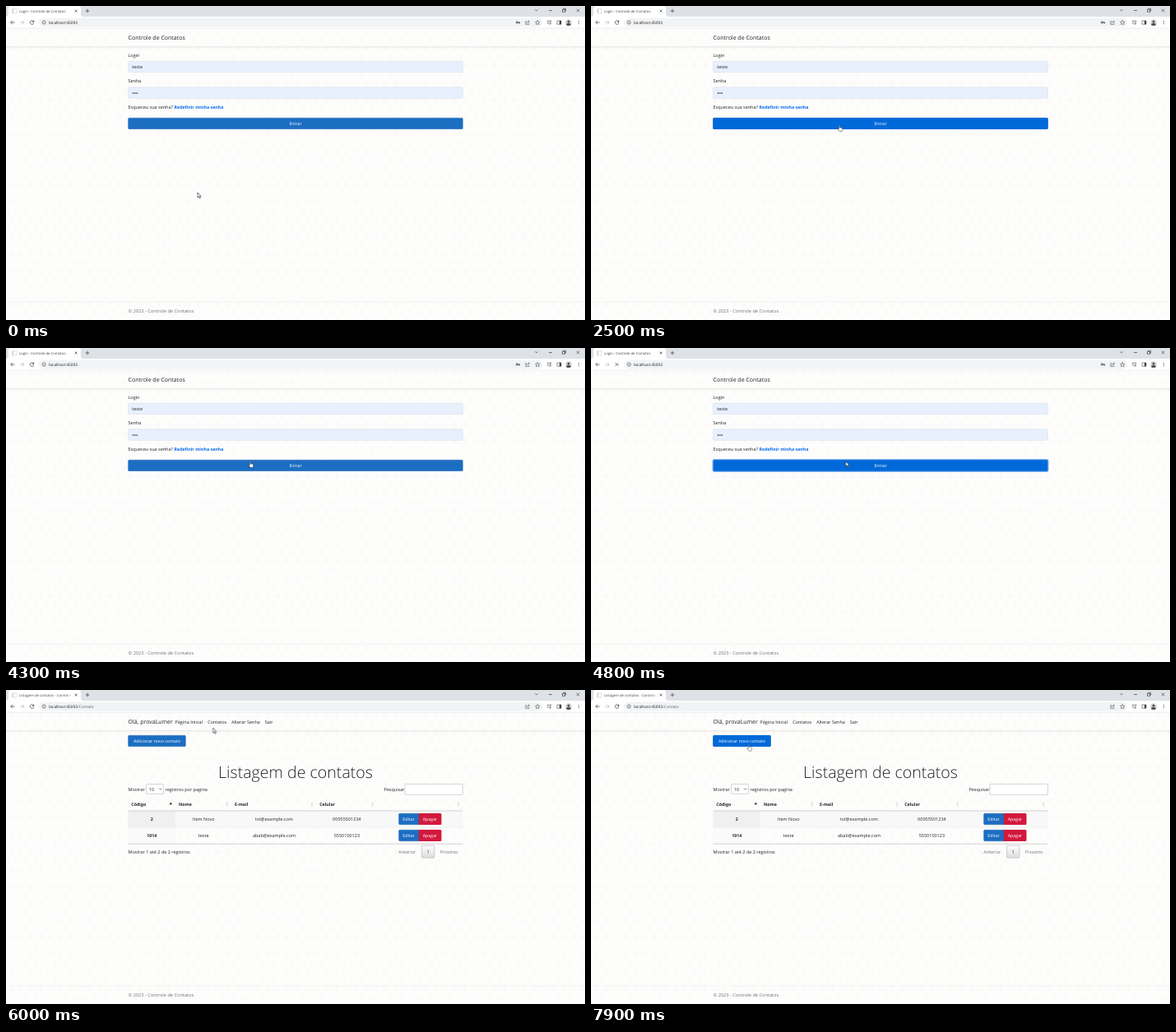
Write an HTML page that moves like this. It is 704x382 px and loops after 8000 ms.

```html
<!DOCTYPE html>
<html lang="pt">
<head>
<meta charset="utf-8">
<title>Controle de Contatos</title>
<style>
html, body { margin: 0; width: 100%; height: 100%; overflow: hidden; background: #fff; }
svg { display: block; width: 100vw; height: 100vh; }
text { font: 5.5px "Open Sans", "Noto Sans", sans-serif; fill: #212529; text-rendering: geometricPrecision; white-space: pre; }
.brand { font-size: 7px; }
.title { font-size: 19.6px; font-weight: 300; }
.tab { font-size: 4.25px; fill: #3c4043; }
.url { font-size: 4.8px; fill: #202124; }
.path { fill: #5f6368; }
.bold { font-weight: 700; font-size: 5.3px; }
.link { fill: #0b6cf0; }
.mid { text-anchor: middle; }
.btn { font-size: 5.3px; fill: #fff; text-anchor: middle; }
.mute { fill: #6c757d; }
.foot { font-size: 5.65px; }
.line { fill: none; stroke: #3c4043; stroke-width: .7; }
.field { fill: #e8f0fe; stroke: #ced4da; stroke-width: .4; }
.box { fill: #fff; stroke: #aaa; stroke-width: .5; }
.blue { fill: #1b6ec2; stroke: #1861ac; stroke-width: .4; }
.red { fill: #d2193d; }

/* 100 ms of the loop is 1.25%; the small lead keeps steps clear of the 100 ms marks */
.login, .home, .list, .load, .still, .hot, .ring, .caret, .add, .arrow, .beam, .hand, .cursor {
  animation: 8s step-end -20ms infinite;
}
.login { animation-name: login; }
.home { animation-name: home; }
.list { animation-name: list; }
.load { animation-name: load; }
.still { animation-name: still; }
.hot { animation-name: hot; }
.ring { animation-name: ring; }
.caret { animation-name: caret; }
.add { animation-name: add; }
.arrow { animation-name: arrow; }
.beam { animation-name: beam; }
.hand { animation-name: hand; }
.cursor { animation-name: move; }
@keyframes login { 0% { opacity: 1 } 63.75%, 100% { opacity: 0 } }
@keyframes home { 0%, 73.75%, 100% { opacity: 0 } 63.75% { opacity: 1 } }
@keyframes list { 0% { opacity: 0 } 73.75%, 100% { opacity: 1 } }
@keyframes load { 0%, 63.75%, 73.75%, 100% { opacity: 0 } 58.75%, 72.5% { opacity: 1 } }
@keyframes still { 0%, 63.75%, 73.75%, 100% { opacity: 1 } 58.75%, 72.5% { opacity: 0 } }
@keyframes hot { 0%, 33.75%, 100% { opacity: 0 } 28.75%, 56.25% { opacity: 1 } }
@keyframes ring { 0% { opacity: 0 } 57.5%, 100% { opacity: 1 } }
@keyframes caret { 0%, 46.25%, 100% { opacity: 0 } 40% { opacity: 1 } }
@keyframes add { 0% { opacity: 0 } 86.25%, 100% { opacity: 1 } }
@keyframes arrow {
  0%, 23.75%, 33.75%, 50%, 58.75%, 75% { opacity: 1 }
  20%, 28.75%, 36.25%, 53.75%, 70%, 86.25%, 100% { opacity: 0 }
}
@keyframes beam { 0%, 23.75%, 50%, 100% { opacity: 0 } 20%, 36.25% { opacity: 1 } }
@keyframes hand {
  0%, 33.75%, 58.75%, 75% { opacity: 0 }
  28.75%, 53.75%, 70%, 86.25%, 100% { opacity: 1 }
}
@keyframes move {
  0% { transform: translate(233px, 227px) }
  17.5% { transform: translate(233px, 227px); animation-timing-function: steps(2) }
  20% { transform: translate(257px, 103px) }
  21.25% { transform: translate(257px, 103px); animation-timing-function: steps(7) }
  30% { transform: translate(302px, 145px) }
  32.5% { transform: translate(302px, 145px); animation-timing-function: steps(5) }
  38.75% { transform: translate(222px, 76px) }
  40% { transform: translate(222px, 76px); animation-timing-function: steps(2) }
  42.5% { transform: translate(224.5px, 82px) }
  43.75% { transform: translate(224.5px, 82px); animation-timing-function: steps(9) }
  55% { transform: translate(306px, 145px) }
  56.25% { transform: translate(309.7px, 138px) }
  62.5% { transform: translate(309.7px, 138px); animation-timing-function: steps(3) }
  66.25% { transform: translate(258px, 56px); animation-timing-function: steps(2) }
  68.75% { transform: translate(252.5px, 46px); animation-timing-function: steps(2) }
  71.25% { transform: translate(254px, 40px) }
  73.75% { transform: translate(254px, 40px); animation-timing-function: steps(2) }
  76.25% { transform: translate(249.3px, 52.5px) }
  82.5% { transform: translate(249.3px, 52.5px); animation-timing-function: steps(5) }
  88.75% { transform: translate(197px, 66px); animation-timing-function: steps(2) }
  91.25%, 100% { transform: translate(191.7px, 66.5px) }
}
</style>
</head>
<body>
<svg viewBox="0 0 704 382" preserveAspectRatio="none">
  <defs>
    <circle id="c" r="12" fill="none" stroke="#f8f7f4" stroke-width=".5"/>
    <pattern id="petals" width="12" height="20.78" patternUnits="userSpaceOnUse">
      <use href="#c"/><use href="#c" x="12"/><use href="#c" y="20.78"/><use href="#c" x="12" y="20.78"/>
      <use href="#c" x="6" y="10.39"/><use href="#c" x="-6" y="10.39"/><use href="#c" x="18" y="10.39"/>
      <use href="#c" x="6" y="-10.39"/><use href="#c" x="6" y="31.17"/>
    </pattern>
    <linearGradient id="fade"><stop stop-color="#fff" stop-opacity="0"/><stop offset="1" stop-color="#fff"/></linearGradient>
    <linearGradient id="shade" x2="0" y2="1"><stop stop-color="#000" stop-opacity=".07"/><stop offset="1" stop-color="#000" stop-opacity="0"/></linearGradient>
    <linearGradient id="page" x2="0" y2="1"><stop stop-color="#fff"/><stop offset="1" stop-color="#dcdcdc"/></linearGradient>
    <clipPath id="tabClip"><path d="M14 0H80V13H14Z"/></clipPath>
    <clipPath id="face"><circle cx="684" cy="20" r="4"/></clipPath>
    <g id="sort" fill="#d0d0d0"><path d="M-1.6-.7H1.6L0-2.6Z"/><path d="M-1.6 .7H1.6L0 2.6Z"/></g>
    <g id="nav">
      <text class="brand" x="148.5" y="41.4">Olá, provaLumer</text>
      <text x="205.5" y="41">Página Inicial</text>
      <text x="245.2" y="41">Contatos</text>
      <text x="274.2" y="41">Alterar Senha</text>
      <text x="314.8" y="41">Sair</text>
    </g>
  </defs>

  <!-- page -->
  <path fill="#fefefd" d="M0 27H704V382H0Z"/>
  <path fill="url(#petals)" d="M0 27H704V382H0Z"/>
  <path fill="url(#shade)" d="M0 49H704V52H0Z"/>
  <path stroke="#e8eaeb" stroke-width=".5" d="M0 49H704M0 360H704"/>
  <text class="mute foot" x="148.5" y="373.2">© 2023 - Controle de Contatos</text>

  <!-- browser -->
  <path fill="#dee1e6" d="M0 0H704V13H0Z"/>
  <path fill="#fff" d="M0 13H704V27H0Z"/>
  <path stroke="#dadce0" stroke-width=".5" d="M0 27.2H704"/>
  <path fill="#fff" d="M0 13Q3 13 3 10V3Q3 0 6 0H88Q91 0 91 3V10Q91 13 94 13Z"/>
  <path fill="#fff" stroke="#c3c7cc" stroke-width=".5" d="M8 3.5H12.5V9H8Z"/>
  <path stroke="#8a9097" stroke-width=".5" d="M8.2 4V8.8"/>
  <path class="line" d="M83.6 4.6l2.8 2.8m0-2.8l-2.8 2.8M96.7 6H101.3M99 3.7V8.3"/>
  <path class="line" d="M643.4 4.3L645 5.9L646.6 4.3M660 5.5H664M676.5 4.3H679.5V7.3H676.5ZM677.6 4V3.2H680.6V6.2H679.8M693.8 3.7l3.4 3.4m0-3.4l-3.4 3.4"/>
  <rect x="40" y="14.7" width="612" height="10.8" rx="5.4" fill="#f1f3f4"/>
  <path class="line" d="M10.6 20H5.8M8 17.7L5.7 20L8 22.3"/>
  <path class="line" style="stroke:#b4b7bb" d="M17.2 20H22M19.8 17.7L22.1 20L19.8 22.3"/>
  <g class="still"><path class="line" d="M33.2 18.4A2.3 2.3 0 1 0 33.8 20.6"/><path fill="#3c4043" d="M34.1 17.3V19.7H31.7Z"/></g>
  <path class="line load" d="M29.6 18.1l3.8 3.8m0-3.8l-3.8 3.8"/>
  <g class="line" style="stroke-width:.55">
    <circle cx="46.2" cy="20" r="2.1"/><path d="M46.2 19.8V21.2M46.2 18.7V19.2"/>
    <path d="M633.2 18.6H631.8V22.3H636V21M633.2 21Q633.4 18.9 636 18.9M635 17.6L636.5 18.9L635 20.2"/>
    <path d="M646.3 17.4l.8 1.8 1.9.2-1.4 1.3.4 1.9-1.7-1-1.7 1 .4-1.9-1.4-1.3 1.9-.2z"/>
    <path d="M657.8 18H662M657.8 19.7H660.5M657.8 21.4H659.6M662.2 18V21.5M662.2 18.2H663.4"/><circle cx="661.5" cy="21.6" r=".7"/>
    <path d="M670 17.9H675V22.2H670Z"/>
  </g>
  <path fill="#3c4043" d="M672.9 18H675V22.2H672.9Z"/>
  <g clip-path="url(#face)"><circle cx="684" cy="20" r="4" fill="#d8d8da"/><circle cx="684" cy="18.9" r="1.5" fill="#54504f"/><ellipse cx="684" cy="23.6" rx="3" ry="2.8" fill="#54504f"/></g>
  <g fill="#3c4043"><circle cx="696.3" cy="18.2" r=".55"/><circle cx="696.3" cy="20" r=".55"/><circle cx="696.3" cy="21.8" r=".55"/></g>

  <g class="login">
    <text class="tab" x="16" y="7.7">Login - Controle de Contatos</text>
    <text class="url" x="52" y="21.8">localhost:45093</text>
    <path fill="none" stroke="#3c4043" stroke-width="1" d="M622.3 20H625M624.4 20V21.4"/>
    <circle cx="621.4" cy="20" r="1.1" fill="none" stroke="#3c4043" stroke-width=".9"/>
    <text class="brand" x="148.5" y="41.4">Controle de Contatos</text>
    <text x="148.5" y="62">Login</text>
    <rect class="field" x="148.6" y="67.2" width="406.8" height="13.6" rx="1.4"/>
    <text x="153.3" y="76.2">teste</text>
    <path class="caret" stroke="#111" stroke-width=".5" d="M166.3 71V77.4"/>
    <text x="148.5" y="93.3">Senha</text>
    <rect class="field" x="148.6" y="98.7" width="406.8" height="13.6" rx="1.4"/>
    <g fill="#111"><circle cx="154.5" cy="106" r=".8"/><circle cx="156.9" cy="106" r=".8"/><circle cx="159.3" cy="106" r=".8"/></g>
    <text x="148.5" y="125">Esqueceu sua senha?</text>
    <text class="bold link" x="204.5" y="125">Redefinir minha senha</text>
    <rect class="blue" x="148.6" y="136.2" width="406.8" height="13.6" rx="1.4"/>
    <rect class="hot" x="148.4" y="136" width="407.2" height="14" rx="1.5" fill="#0069d9"/>
    <rect class="ring" x="148" y="135.6" width="408" height="14.8" rx="1.8" fill="none" stroke="#7db4ee" stroke-width="1.1"/>
    <text class="btn" x="352" y="145">Entrar</text>
  </g>

  <g class="home">
    <text class="tab" x="16" y="7.7" clip-path="url(#tabClip)">Página Inicial - Controle de Contatos</text>
    <text class="url" x="52" y="21.8">localhost:45093<tspan class="path">/Home</tspan></text>
    <use href="#nav"/>
    <text class="title mid" x="352" y="75.8">Bem vindo!</text>
    <text class="mid" x="352" y="89.2">Sistema de controle de Contatos</text>
  </g>

  <g class="list">
    <text class="tab" x="16" y="7.7" clip-path="url(#tabClip)">Listagem de contatos - Controle de Contatos</text>
    <text class="url" x="52" y="21.8">localhost:45093<tspan class="path">/Contato</tspan></text>
    <use href="#nav"/>
    <rect class="blue" x="148.6" y="55.2" width="69.8" height="13.6" rx="1.4"/>
    <rect class="add" x="148.4" y="55" width="70.2" height="14" rx="1.5" fill="#0069d9"/>
    <text class="btn" x="183.5" y="64">Adicionar novo contato</text>
    <text class="title mid" x="352" y="107.2">Listagem de contatos</text>
    <text x="148.5" y="123">Mostrar</text>
    <rect class="box" x="170.6" y="114.6" width="20.8" height="11.8" rx="1.1"/>
    <text x="173.8" y="122.6">10</text>
    <path class="line" d="M186.2 119.7L187.7 121.2L189.2 119.7"/>
    <text x="193.5" y="123">registros por pagina</text>
    <text x="459.4" y="123">Pesquisar</text>
    <rect class="box" x="485" y="114.4" width="70.4" height="12.9" rx="1.1"/>

    <path fill="#f8f8f8" d="M148.4 147H555.6V167H148.4Z"/>
    <path fill="#f0f0f0" d="M148.4 147H206V167H148.4Z"/>
    <path fill="#fafafa" d="M148.4 167H206V187H148.4Z"/>
    <path stroke="#dee2e6" stroke-width=".4" d="M148.4 167H555.6"/>
    <path stroke="#a9abad" stroke-width=".5" d="M148.4 147H555.6M148.4 187.2H555.6"/>
    <text class="bold" x="152.3" y="141">Código</text>
    <text class="bold" x="210" y="141">Nome</text>
    <text class="bold" x="278" y="141">E-mail</text>
    <text class="bold" x="381.2" y="141">Celular</text>
    <path fill="#333" d="M198.5 139.2H202.1L200.3 136.6Z"/>
    <use href="#sort" x="268.5" y="139"/><use href="#sort" x="372" y="139"/><use href="#sort" x="445.7" y="139"/><use href="#sort" x="550" y="139"/>
    <g class="mid">
      <text class="bold" x="177.2" y="159">2</text>
      <text x="240.2" y="159">Item Novo</text>
      <text x="326" y="159">tst@example.com</text>
      <text x="414.4" y="159">00955501234</text>
      <text class="bold" x="177.2" y="179">1014</text>
      <text x="240.2" y="179">teste</text>
      <text x="326" y="179">abab@example.com</text>
      <text x="414.4" y="179">5550100123</text>
    </g>
    <g id="acts">
      <path class="blue" d="M502 150.2H479Q477.6 150.2 477.6 151.6V162.4Q477.6 163.8 479 163.8H502Z"/>
      <path class="red" d="M501.8 150H528Q529.5 150 529.5 151.5V162.5Q529.5 164 528 164H501.8Z"/>
      <text class="btn" x="489.5" y="159">Editar</text>
      <text class="btn" x="515.5" y="159">Apagar</text>
    </g>
    <use href="#acts" y="20"/>
    <text x="148.5" y="198.6">Mostrar 1 até 2 de 2 registros</text>
    <text class="mute" x="477.2" y="198.8">Anterior</text>
    <rect x="505.6" y="189.2" width="15.2" height="15" rx=".8" fill="url(#page)" stroke="#a5a5a5" stroke-width=".5"/>
    <text class="mid" x="513.2" y="198.8">1</text>
    <text class="mute" x="528" y="198.8">Proximo</text>
  </g>
  <path fill="url(#fade)" d="M73 2H81V11H73Z"/>

  <g class="cursor">
    <path class="arrow" fill="#fff" stroke="#222" stroke-width=".6" d="M0 0V6L1.4 4.8L2.4 7.1L3.4 6.7L2.4 4.4H4.2Z"/>
    <path class="beam" fill="none" stroke="#222" stroke-width=".6" d="M-1.4-2.9H-.5L0-2.5L.5-2.9H1.4M0-2.5V2.5M-1.4 2.9H-.5L0 2.5L.5 2.9H1.4"/>
    <path class="hand" fill="#fff" stroke="#222" stroke-width=".5" d="M-.6 4.6V.5Q0-.4 .6 .5V3Q1.2 2.5 1.7 3.1Q2.3 2.7 2.7 3.4Q3.4 3.1 3.7 3.9V5.6Q3.6 6.6 3 7.6H.2L-1.9 4.7Q-1.8 3.7-.6 4.6Z"/>
  </g>
</svg>
</body>
</html>
```
